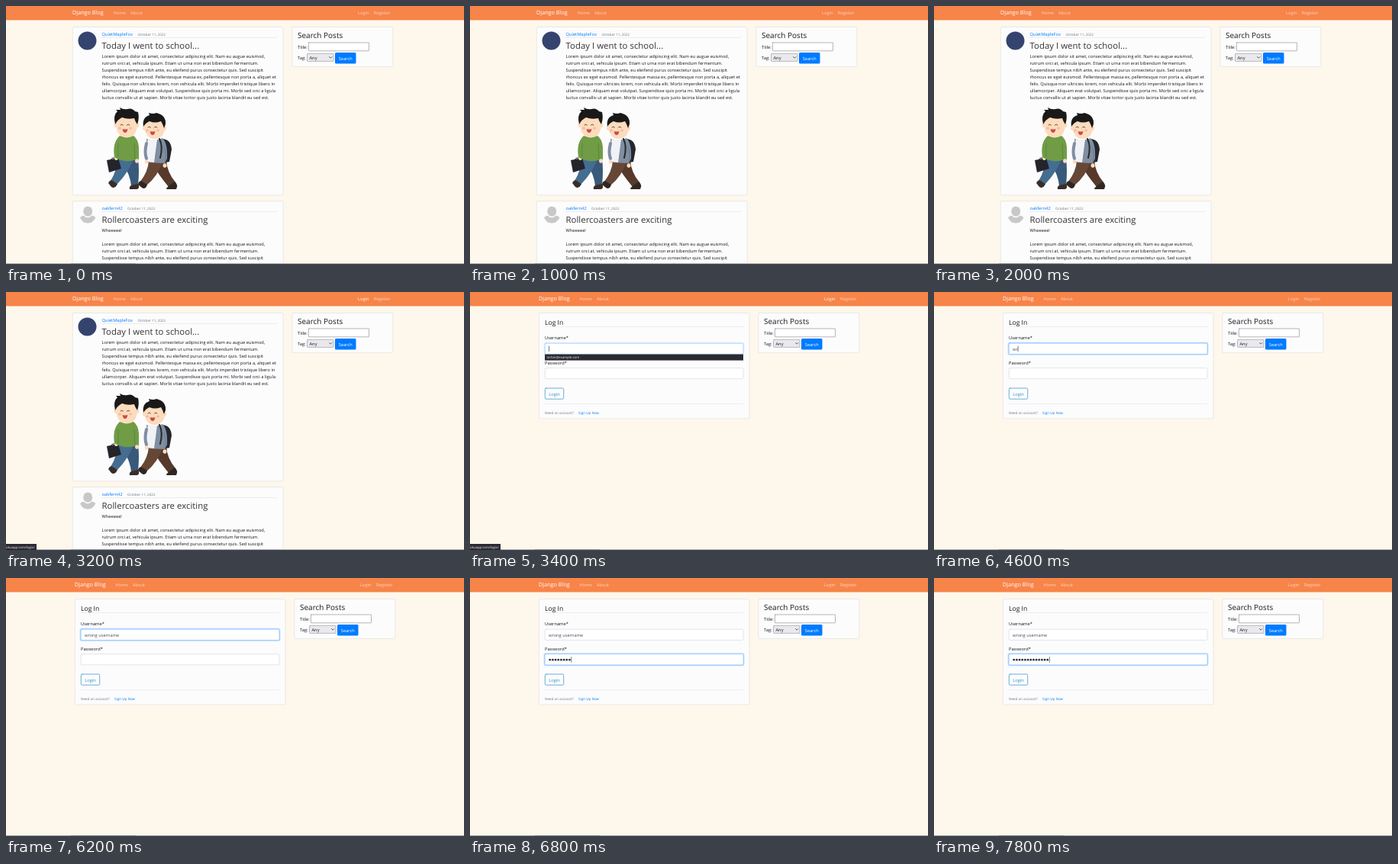
An HTML page with a canvas that plays this animation: 600x338 px, repeating every 8 s.

```html
<!DOCTYPE html>
<html lang="en">
<head>
<meta charset="utf-8">
<title>Blog login</title>
<style>
html, body { margin: 0; width: 100%; height: 100%; overflow: hidden; background: #fef7ec; }
canvas { display: block; width: 100vw; height: 100vh; }
</style>
</head>
<body>
<canvas id="stage"></canvas>
<script>
const W = 600, H = 338, LOOP = 8000, STEP = 200;
const REM = 6.05;
const INK = '#16191c', LINK = '#007bff', CARD = '#fcfcfd', RULE = '#e3e4e6', DARK = '#2b2a33';
const SKIN = '#fcdcbd', HAIR = '#1b1918';
const canvas = document.getElementById('stage');
const ctx = canvas.getContext('2d');
const ratio = window.devicePixelRatio || 1;
canvas.width = Math.round(W * ratio);
canvas.height = Math.round(H * ratio);

const LOREM = [
  'Lorem ipsum dolor sit amet, consectetur adipiscing elit. Nam eu augue euismod,',
  'rutrum orci at, vehicula ipsum. Etiam ut urna non erat bibendum fermentum.',
  'Suspendisse tempus nibh ante, eu eleifend purus consectetur quis. Sed suscipit',
  'rhoncus ex eget euismod. Pellentesque massa ex, pellentesque non porta a, aliquet et',
  'felis. Quisque non ultricies lorem, non vehicula elit. Morbi imperdiet tristique libero in',
  'ullamcorper. Aliquam erat volutpat. Suspendisse quis porta mi. Morbi sed orci a ligula',
  'luctus convallis ut at sapien. Morbi vitae tortor quis justo lacinia blandit eu sed est.'
];

// Text is set ten times larger and scaled down to keep fractional advances.
function text(str, x, y, color = INK, size = 1, align = 'left') {
  ctx.save();
  ctx.translate(x, y);
  ctx.scale(0.1, 0.1);
  ctx.font = `${size * REM * 9.45}px "Open Sans", "Noto Sans", sans-serif`;
  ctx.textAlign = align;
  ctx.fillStyle = color;
  ctx.fillText(str, 0, 0);
  const width = ctx.measureText(str).width / 10;
  ctx.restore();
  return width;
}

function rect(x, y, w, h, color) {
  ctx.fillStyle = color;
  ctx.fillRect(x, y, w, h);
}

function box(x, y, w, h, r, fill, line, weight = 0.6) {
  ctx.beginPath();
  ctx.roundRect(x, y, w, h, r);
  if (fill) { ctx.fillStyle = fill; ctx.fill(); }
  if (line) { ctx.strokeStyle = line; ctx.lineWidth = weight; ctx.stroke(); }
}

function oval(x, y, rx, ry, color) {
  ctx.beginPath();
  ctx.ellipse(x, y, rx, ry, 0, 0, Math.PI * 2);
  ctx.fillStyle = color;
  ctx.fill();
}

function shape(d, color) {
  ctx.fillStyle = color;
  ctx.fill(new Path2D(d));
}

function stroke(d, color, weight) {
  ctx.strokeStyle = color;
  ctx.lineWidth = weight;
  ctx.lineCap = ctx.lineJoin = 'round';
  ctx.stroke(new Path2D(d));
}

function frame(dx, hover) {
  rect(0, 0, W, H, '#fef7ec');
  rect(0, 0, W, 18.5, '#f78449');
  ctx.save();
  ctx.translate(dx, 0);
  const faded = 'rgba(255,255,255,.65)';
  text('Django Blog', 87, 11.4, '#fff', 1.27);
  text('Home', 140.5, 10.7, faded);
  text('About', 163, 10.7, faded);
  text('Login', 461, 10.7, hover ? '#fff' : faded);
  text('Register', 482, 10.7, faded);

  box(374.8, 27.5, 132, 52, 1.2, CARD, '#dddddd');
  text('Search Posts', 382, 42.4, INK, 1.75);
  text('Title:', 382, 55.8);
  box(396.5, 48, 79, 10.8, 0.5, '#fff', '#85858c', 0.6);
  text('Tag:', 382, 70);
  box(394.5, 62.4, 34.6, 10, 1, '#e9e9ed', '#8f8f9d', 0.6);
  text('Any', 397.5, 69.8);
  stroke('M423.6 66.6l1.6 1.6 1.6-1.6', '#222', 0.7);
  box(431, 61, 27.5, 14.4, 1.5, LINK);
  text('Search', 444.8, 70.6, '#fff', 1, 'center');
  ctx.restore();
}

function face(x, y) {
  oval(x - 7, y + 4, 2, 1.5, '#f8b7a0');
  oval(x + 7, y + 4, 2, 1.5, '#f8b7a0');
  stroke(`M${x - 6} ${y}q1.7 -2 3.4 0M${x + 2.5} ${y}q1.7 -2 3.4 0`, '#2b211d', 0.8);
  shape(`M${x - 3.4} ${y + 5}q3.4 1.2 6.8 0q-.6 5 -3.4 5t-3.4 -5z`, '#c94b42');
}

function leftStudent() {
  shape('M153 200L173 200Q175 215 173 234L164 236Q163 221 153 207z', '#38597a');
  shape('M145 199L167 200Q162 216 146 233L137 229Q146 215 145 199z', '#456d91');
  shape('M138 228L146 233Q143 240 138 237L134 232Q135 229 138 228z', '#3a2c29');
  shape('M164 235L173 233Q176 238 172 240L162 240Q161 237 164 235z', '#3a2c29');
  stroke('M137 202Q140 196 146 201', HAIR, 1);
  shape('M132 202L147 199L151 213L135 218z', '#24242a');
  oval(144.5, 199.5, 2.3, 2.6, SKIN);
  shape('M149 170Q158 173 167 170Q173 174 174 185L174 201L168 202Q158 205 148 201L142 198Q139 179 149 170z', '#6f9c45');
  stroke('M147 180L147 198M168 180L169 200', '#537b32', 0.7);
  oval(171.5, 203, 2.4, 2.8, SKIN);
  oval(144, 156, 2.3, 3, SKIN);
  oval(172, 156, 2.3, 3, SKIN);
  shape('M144 149Q147 142 158 143Q169 142 172 151Q173 172 158 172.5Q143 172 144 149z', SKIN);
  shape('M143 155Q140 143 146 138L144 136L150 136L149 133Q154 136 159 135Q165 133 169 138L173 139Q175 147 172 155Q169 151 168 147Q159 149 152 146Q146 149 143 155z', HAIR);
  face(156, 156);
}

function rightStudent() {
  shape('M193 203L210 202Q211 218 222 231L213 237Q200 221 193 209z', '#553a2c');
  shape('M187 203L205 204Q199 223 184 235L176 230Q186 217 187 203z', '#664735');
  shape('M177 229L185 234Q183 241 178 238L173 234Q173 230 177 229z', '#302624');
  shape('M213 236L221 230Q226 234 223 240L210 240Q210 238 213 236z', '#302624');
  shape('M204 174Q216 174 217 188L214 204Q207 206 203 202z', '#24272d');
  shape('M184 174Q196 178 205 173Q212 180 211 200L208 206L186 205z', '#7f8ea2');
  shape('M186 174L198 175L194 205L186 204Q183 187 186 174z', '#f0f2f5');
  stroke('M201 174Q206 184 202 199', '#24272d', 2);
  stroke('M207 184Q211 195 208 206', '#66758a', 0.7);
  stroke('M184 180Q181 192 184 200', '#7f8ea2', 4);
  oval(208, 209, 2.5, 2.8, SKIN);
  oval(184, 204, 2.3, 2.6, SKIN);
  oval(181, 160, 2, 3, SKIN);
  oval(208, 160, 2, 3, SKIN);
  shape('M181 154Q183 146 195 146Q208 147 208 160Q207 174 194 174Q181 173 181 154z', SKIN);
  shape('M180 158Q178 146 188 143L187 140Q193 142 197 140Q210 143 209 155L207 160Q205 154 203 151Q195 154 188 151Q183 153 180 158z', HAIR);
  face(192, 159);
}

function post(y, name, title) {
  text(name, 125.5, y + 11.5, LINK);
  text('October 11, 2022', y < 100 ? 172.5 : 159, y + 11.5, '#6c757d', 0.8);
  rect(125.5, y + 13.6, 230, 0.6, RULE);
  text(title, 125.5, y + 28.2, '#333', 2);
}

function paragraph(lines, y) {
  lines.forEach((line, i) => text(line, 125.5, y + i * REM * 1.5));
}

function home(hover) {
  frame(0, hover);
  box(87.3, 27.5, 275.7, 220.3, 1.2, CARD, '#dddddd');
  oval(106.5, 45.5, 12, 12, '#35446f');
  post(27.5, 'QuietMapleFox', 'Today I went to school...');
  paragraph(LOREM, 67.8);
  leftStudent();
  rightStudent();

  box(87.3, 255.6, 275.7, 100, 1.2, CARD, '#dddddd');
  shape('M97 277Q99 275 101.5 274.5Q107 280 112.5 274.5Q116 275 117.5 277Q114 284.5 107 284.5T97 277z', '#c8c8c8');
  oval(107.2, 269, 6, 6.6, '#c8c8c8');
  post(255.6, 'oakfern42', 'Rollercoasters are exciting');
  text('Wheeeee!', 125.5, 295.8);
  paragraph(LOREM.slice(0, 4), 314.2);
}

function field(y, glow) {
  if (glow) box(97.5, y - 0.5, 261, 15.2, 2, null, `rgba(0,123,255,${0.28 * glow})`, 1.7);
  box(98.2, y, 259.8, 14.2, 1.5, '#fff', glow ? '#80bdff' : '#ced4da');
}

const typed = (t, start, pace, max) => t < start ? 0 : Math.min(max, 1 + Math.floor((t - start) / pace));
const blink = (t, since) => t < since || (t - since) % 1000 < 500;
const glowAt = (t, start) => Math.max(0, Math.min(1, (t - start) / 150));
const caret = (x, y) => rect(x, y, 0.6, 7.4, '#222');

function login(t, hover) {
  const onPassword = t >= 6400;
  const user = 'wrong username'.slice(0, typed(t, 4400, 105, 14));
  const dots = typed(t, 6450, 45, 13);

  frame(3, hover);
  box(90.3, 27.5, 275.7, 138.4, 1.2, CARD, '#dddddd');
  text('Log In', 98, 42.6, INK, 1.5);
  rect(98, 45.2, 260, 0.6, RULE);

  text('Username*', 98, 62);
  field(67.2, onPassword ? 0 : glowAt(t, 3350));
  const width = text(user, 103, 76.8, '#495057');
  if (!onPassword && blink(t, t < 4400 ? 3400 : 5700)) caret(103 + width, 70.6);

  text('Password*', 98, 94.8);
  field(99.6, onPassword ? glowAt(t, 6350) : 0);
  for (let i = 0; i < dots; i++) oval(104.7 + i * 3.67, 107.2, 1.35, 1.35, '#30343a');
  if (onPassword && blink(t, 6800)) caret(103.2 + dots * 3.67, 103.2);

  if (t < 4400) {
    rect(98, 81.6, 260, 8, DARK);
    text('tarbin@example.com', 100.5, 87.2, '#f4f4f6', 0.75);
  }

  box(98.3, 126, 24.4, 14.2, 1.5, null, '#2b8fc0', 0.7);
  text('Login', 110.5, 135.6, '#2b8fc0', 1, 'center');
  rect(98, 146.4, 260, 0.6, RULE);
  text('Need an account?', 98, 160, '#6c757d', 0.8);
  text('Sign Up Now', 142, 160, LINK, 0.8);
}

function draw(now) {
  const t = Math.floor((now % LOOP) / STEP) * STEP;
  const hover = t >= 2600 && t < 3800;
  ctx.setTransform(canvas.width / W, 0, 0, canvas.height / H, 0, 0);
  ctx.textRendering = 'geometricPrecision';
  if (t < 3400) home(hover);
  else login(t, hover);

  rect(0, 337, W, 1, '#a3a6aa');
  rect(85, 337, 85, 1, '#83878c');
  if (hover) {
    rect(0, 330, 40, 8, DARK);
    text('okuapp.com/login/', 37.8, 335.8, '#f4f4f6', 0.75, 'right');
  }
}

let begin;
function tick(now) {
  begin ??= now;
  draw(now - begin);
  requestAnimationFrame(tick);
}
draw(0);
requestAnimationFrame(tick);
</script>
</body>
</html>
```
